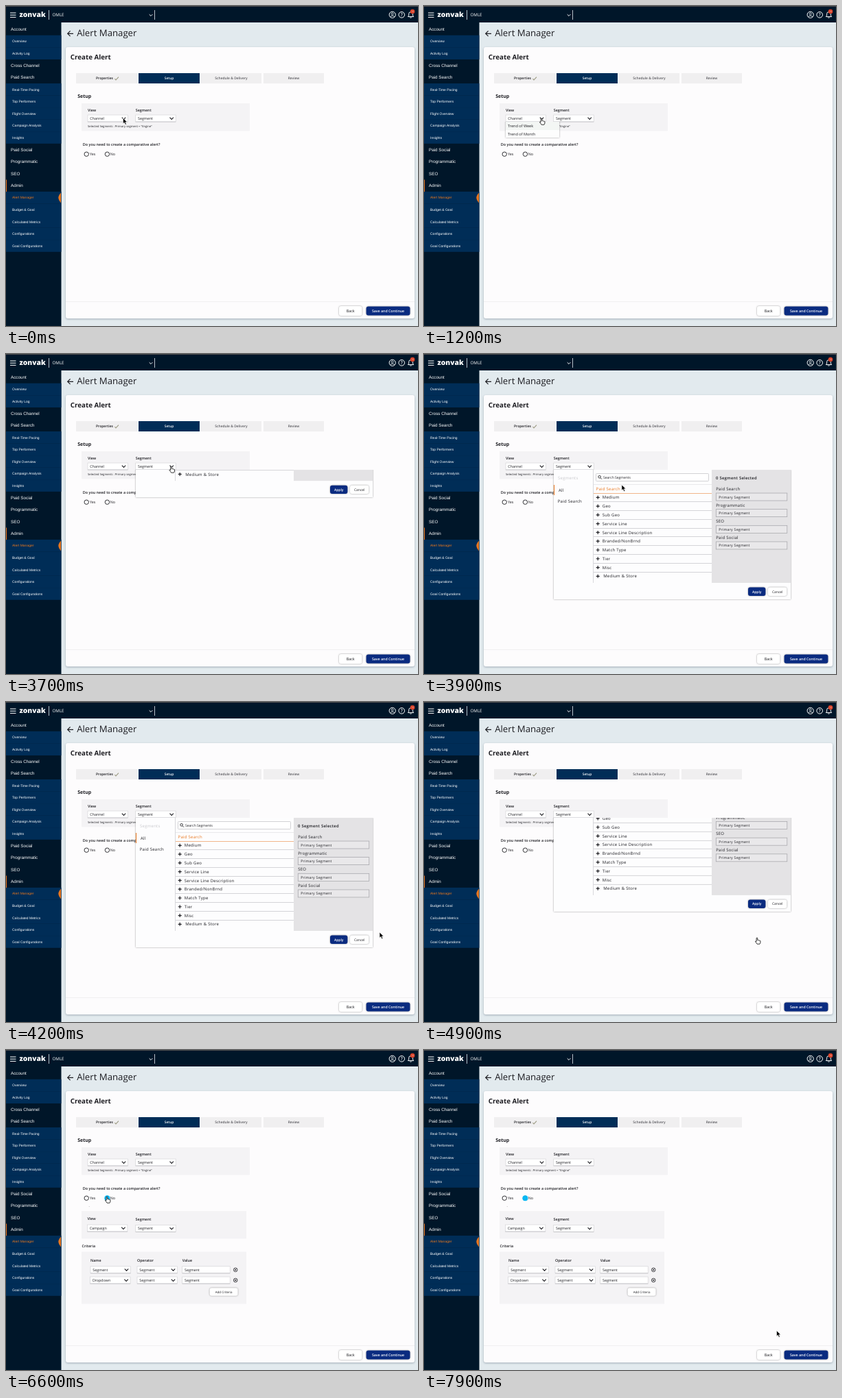
Recreate the animation shown at these times as an HTML page. Size 600 by 467 pixels, loop 8 s.

```html
<!DOCTYPE html>
<html lang="en">
<head>
<meta charset="utf-8">
<title>Alert Manager</title>
<style>
html, body { margin: 0; width: 100%; height: 100%; overflow: hidden; background: #e2eaee; }
svg { display: block; width: 100vw; height: 100vh; }
text { font-family: "Open Sans", "Noto Sans", sans-serif; text-rendering: geometricPrecision; white-space: pre; }
.side { font-family: "Liberation Sans", Arial, sans-serif; }
.soft { filter: drop-shadow(0 .6px 1px rgba(0, 0, 0, .4)); }
.card { filter: drop-shadow(0 1px 1.5px rgba(40, 60, 80, .35)); }
</style>
</head>
<body>
<svg id="stage" viewBox="0 0 600 467" preserveAspectRatio="none"></svg>
<script>
const LOOP = 8000, STEP = 100;
const INK = '#1d1d22', NAVY = '#002d57', BLUE = '#0a2b80', ORANGE = '#e8761e', PALE = '#f4f3f5';

const rect = (x, y, w, h, fill, more = '') =>
  `<rect x="${x}" y="${y}" width="${w}" height="${h}" fill="${fill}" ${more}/>`;
const path = (d, color = INK, w = 1, more = '') =>
  `<path d="${d}" fill="none" stroke="${color}" stroke-width="${w}" ${more}/>`;
const ring = (x, y, r, color, w, fill = 'none') =>
  `<circle cx="${x}" cy="${y}" r="${r}" fill="${fill}" stroke="${color}" stroke-width="${w}"/>`;
// y is the middle of the capitals
const text = (x, y, s, size = 5.4, o = {}) =>
  `<text x="${x}" y="${(y + size * .35).toFixed(2)}" font-size="${size}" font-weight="${o.weight || 400}"` +
  ` fill="${o.fill || INK}" text-anchor="${o.anchor || 'start'}" letter-spacing="${o.gap || 0}" class="${o.cls || ''}">` +
  s.replace(/&/g, '&amp;') + '</text>';
const bold = (x, y, s, size = 5.4, fill = INK) => text(x, y, s, size, { weight: 600, fill });
const mid = (x, y, s, size, fill = INK, weight = 400) => text(x, y, s, size, { anchor: 'middle', fill, weight });
const wide = (x, y, s, fill = INK, size = 6, weight = 400) => text(x, y, s, size, { gap: .25, fill, weight });
const chevron = (x, y, color = INK, s = 2.7, w = 1.1) =>
  path(`M${x - s} ${y - s / 2}l${s} ${s}l${s} ${-s}`, color, w);
const field = (x, y, w, s) =>
  rect(x, y, w, 10, '#fff', 'stroke="#cfcfd3" stroke-width=".6"') +
  path(`M${x} ${y + 10}h${w}`, '#b0b0b5', .6) + text(x + 3.3, y + 5, s, 5.35);
const select = (x, y, s) => field(x, y, 58.5, s) + chevron(x + 52.5, y + 5);
const button = (x, y, w, h, s, size, primary) =>
  rect(x, y, w, h, primary ? BLUE : '#fff', 'rx="3" class="soft"') +
  mid(x + w / 2, y + h / 2, s, size, primary ? '#fff' : INK, primary ? 600 : 500);

function header() {
  return rect(0, 0, 600, 24, '#001629') + rect(0, 0, 600, 1, '#4a4b4c') +
    path('M6 10h8.5M6 13.2h8.5M6 16.4h8.5', '#fff', 1) +
    text(19.5, 12.6, 'zonvak', 10.3, { weight: 800, fill: '#fff' }) +
    path('M62.5 6v14M216.5 6v14', '#e6ebf0', .8) +
    text(67.5, 13.2, 'OMLE', 6.2, { fill: '#fff' }) + chevron(211, 13.4, '#fff', 2.3, 1) +
    ring(562.7, 12.8, 4.6, '#fff', 1) + ring(562.7, 11.4, 1.5, '#fff', .8) +
    path('M559.6 15.8q3.1 -3.2 6.2 0', '#fff', .9) +
    ring(576.2, 12.8, 4.3, '#fff', 1) + mid(576.2, 12.8, '?', 6.6, '#fff', 600) +
    path('M585.4 15.6h8.2l-1.2 -1.8v-2.2a2.9 2.9 0 0 0 -5.8 0v2.2zM588.3 16.6q1.2 1.6 2.4 0', '#fff', 1) +
    ring(592, 8, 3.3, 'none', 0, '#d9432b') + mid(592, 8, '10', 3, '#f6c9bf');
}

const MENU = ['Account', '-Overview', '-Activity Log', 'Cross Channel', 'Paid Search', '-Real-Time Pacing',
  '-Top Performers', '-Flight Overview', '-Campaign Analysis', '-Insights', 'Paid Social', 'Programmatic',
  'SEO', 'Admin', '-Alert Manager', '-Budget & Goal', '-Calculated Metrics', '-Configurations', '-Goal Configurations'];

function sidebar() {
  let out = rect(0, 24, 80.5, 443, '#001629');
  MENU.forEach((name, i) => {
    const y = 34 + 17.55 * i, sub = name[0] === '-';
    if (sub) out += rect(0, y - 8.8, 80.5, 17.7, NAVY);
    const fill = name === '-Alert Manager' ? ORANGE : '#fff';
    out += text(sub ? 9 : 7, y, sub ? name.slice(1) : name, sub ? 5 : 6.3, { cls: 'side', fill });
  });
  return out + rect(0, 253.5, 1, 17.5, ORANGE) +
    `<path d="M80 272.5Q76 277 76.3 280Q76.5 283 80 287.5z" fill="${ORANGE}"/>`;
}

function page() {
  const tab = (x, w, fill) => rect(x, 98, w, 15, fill);
  return rect(80, 24, 520, 443, '#e2eaee') +
    path('M98 40.3h-8M93.6 36.4l-3.9 3.9l3.9 3.9', INK, 1.2) +
    text(103.2, 39.4, 'Alert Manager', 13.2) +
    rect(87, 60, 508, 396, '#fdfcfd', 'rx="3" class="card"') +
    path('M87 431.5h508', '#f0eff1', 1) +
    text(93.7, 74.6, 'Create Alert', 9.8, { weight: 700 }) +
    tab(102, 90, '#f0eff0') + tab(193, 89, NAVY) + tab(284, 88, '#f0eff0') + tab(375, 88, '#f0eff0') +
    bold(131, 105.6, 'Properties', 5) + path('M158.3 106l1.7 1.9l4 -4.2', '#9b9a83', 1.1) +
    mid(237.6, 105.6, 'Setup', 4.9, '#fff', 600) +
    mid(328, 105.6, 'Schedule & Delivery', 4.95, '#58585d', 600) + mid(419, 105.6, 'Review', 4.95, '#58585d', 600) +
    text(104.2, 132, 'Setup', 7, { weight: 700 }) +
    rect(110, 142, 245, 40.4, PALE) +
    bold(119, 151.7, 'View') + bold(188.8, 151.7, 'Segment') +
    select(119, 159, 'Channel') + select(188.7, 159, 'Segment') +
    text(119.1, 175.6, 'Selected Segments : Primary segment = "Engine"', 4.17) +
    bold(111.8, 202, 'Do you need to create a comparative alert?', 5.45) +
    ring(117.2, 216.2, 3.2, INK, .9) + text(122, 216.2, 'Yes') +
    ring(147.4, 216.2, 3.2, INK, .9) + text(151.8, 216.2, 'No') +
    button(485, 438, 33.4, 14, 'Back', 5.5) + button(524.6, 438.4, 63.8, 13.2, 'Save and Continue', 5.25, true);
}

function criteria() {
  const row = (x, y, s) => select(x, y, s) + select(191, y, 'Segment') + field(256.7, y, 69.5, 'Segment') +
    ring(334.2, y + 5, 2.8, INK, .8) + path(`M332.9 ${y + 3.7}l2.6 2.6m0 -2.6l-2.6 2.6`, INK, .9);
  return ring(147.4, 216.2, 4, 'none', 0, '#08b8f4') + rect(120.8, 228, .8, .8, '#a5a5a8') +
    rect(110, 235, 240, 40.4, PALE) +
    bold(118.4, 245.8, 'View') + bold(188.6, 246.8, 'Segment') +
    select(118.4, 255, 'Campaign') + select(188.7, 255.4, 'Segment') +
    bold(110.6, 286, 'Criteria') + rect(110, 294.5, 240, 76, PALE) +
    bold(123, 307, 'Name') + bold(191, 307, 'Operator') + bold(256.7, 307, 'Value') +
    row(123, 315.8, 'Segment') + row(122.6, 331, 'Dropdown') +
    button(296.6, 347.2, 41, 11.6, 'Add Criteria', 4.5);
}

function viewMenu() {
  const item = (y, s) => text(122, y, s, 5.55, { weight: 500 });
  return rect(119, 160, 78, 32, '#fdfdfd', 'class="soft"') + rect(119, 169, 78, 12, '#f3f6f4') +
    item(175.3, 'Trend of Week') + item(186.6, 'Trend of Month');
}

const GROUPS = ['Medium', 'Geo', 'Sub Geo', 'Service Line', 'Service Line Description',
  'Branded/NonBrnd', 'Match Type', 'Tier', 'Misc', 'Medium & Store'];

function segmentPanel() {
  let out = rect(189, 169, 345, 189, '#fdfdfe', 'class="soft"') +
    wide(195, 180.6, 'Segments', '#c9c9cd') + rect(189, 191, 1, 15, ORANGE) +
    wide(196, 198.6, 'All') + wide(194.7, 215, 'Paid Search') +
    path('M246.5 169v165', '#cfcfd3', .8) +
    rect(250.5, 174.5, 164, 11, '#fff', 'stroke="#c0c0c4" stroke-width=".7" rx="1"') +
    ring(255.6, 179.3, 1.8, INK, .9) + path('M257 180.7l2 2', INK, .9) +
    text(261, 180, 'Search Segments', 5) +
    path('M247 190.5h172', '#dcdcdf', .6) + wide(250.6, 196.4, 'Paid Search', ORANGE);
  GROUPS.forEach((name, i) => {
    const y = 209.3 + 12.78 * i;
    out += path(`M247 ${Math.floor(y - 6.3) + .5}h172`, i ? '#cbcbcf' : '#efa56c', .8) +
      path(`M250.7 ${y}h5M253.2 ${y - 2.5}v5`, INK, 1.2) + wide(i === 9 ? 261.2 : 259.8, y, name);
  });
  out += rect(419, 169, 115, 165, '#e4e3e5') + wide(425, 180.6, '0 Segment Selected', INK, 5.9, 600);
  ['Paid Search', 'Programmatic', 'SEO', 'Paid Social'].forEach((name, i) => {
    const y = 197 + 23.65 * i;
    out += wide(425.2, y, name) +
      rect(425.3, y + 6, 103.5, 11, '#e9e8ea', 'stroke="#a2a2a6" stroke-width=".7"') +
      wide(429.2, y + 11.7, 'Primary Segment', INK, 5.2);
  });
  return out + button(472, 340.6, 25.4, 12.4, 'Apply', 5, true) + button(501, 340.6, 27.3, 12.4, 'Cancel', 5);
}

const arrow = '<path id="arrow" d="M0 0v8.2l1.9 -1.7l1.4 3.2l1.5 -.7l-1.4 -3.1h2.6z" fill="#000" stroke="#fff" stroke-width=".6"/>';
const hand = '<path id="hand" d="M-.9 .5q.9 -1 1.7 0v3.2q1 -.6 1.5 .2q.9 -.5 1.4 .3q1 -.3 1.2 .7v2.2q-.3 1.2 -.9 2.1h-3.9q-1.3 -2 -2.6 -3.6q.1 -1.2 1.6 -.2z" fill="#fff" stroke="#000" stroke-width=".8" stroke-linejoin="round"/>';

const stage = document.getElementById('stage');
stage.innerHTML =
  '<defs><clipPath id="below"><rect x="110" y="169" width="440" height="210"/></clipPath></defs>' +
  page() + sidebar() + header() +
  `<g id="criteria">${criteria()}</g>` +
  `<g clip-path="url(#below)"><g id="menu">${viewMenu()}</g></g>` +
  `<g clip-path="url(#below)"><g id="panel">${segmentPanel()}</g></g>` +
  `<g id="cursor">${arrow}${hand}</g>`;
const part = id => document.getElementById(id);

// time, x, y, 1 for the hand
const MOVES = [
  [0, 170.5, 163.5, 0], [500, 171, 164, 1], [1900, 171, 164, 1], [2400, 164, 197, 0], [2600, 164, 197, 0],
  [3300, 240.5, 164, 1], [3800, 240.5, 164, 1], [4200, 544, 336, 0], [4400, 544, 336, 0], [4700, 485, 344, 1],
  [5000, 485, 344, 1], [5600, 225, 280, 0], [6300, 147, 214, 1], [6900, 147, 214, 1], [7700, 513.5, 409.5, 0],
  [LOOP, 513.5, 409.5, 0]
];
const ease = p => { p = Math.min(1, Math.max(0, p)); return p * p * (3 - 2 * p); };
const slide = (t, open, close) => ease((t - open) / 300) - ease((t - close) / 300);
const show = (el, on) => el.setAttribute('visibility', on ? 'visible' : 'hidden');

function drop(id, height, amount) {
  part(id).setAttribute('transform', `translate(0 ${height * (amount - 1)})`);
  show(part(id), amount > 0);
}

function draw(t) {
  const i = MOVES.findIndex((m, k) => k === MOVES.length - 2 || t < MOVES[k + 1][0]);
  const a = MOVES[i], b = MOVES[i + 1], p = ease((t - a[0]) / (b[0] - a[0]));
  part('cursor').setAttribute('transform', `translate(${a[1] + (b[1] - a[1]) * p} ${a[2] + (b[2] - a[2]) * p})`);
  const isHand = a[3] ? b[3] || p < .1 : b[3] && p > .9;
  show(part('hand'), isHand);
  show(part('arrow'), !isHand);
  drop('menu', 35, slide(t, 900, 1900));
  drop('panel', 201, slide(t, 3600, 4800));
  show(part('criteria'), t >= 6600);
}

const start = performance.now();
function tick() {
  const t = Math.max(0, performance.now() - start) % LOOP;
  draw(Math.floor(t / STEP) * STEP);
  requestAnimationFrame(tick);
}
draw(0);
requestAnimationFrame(tick);
</script>
</body>
</html>
```
